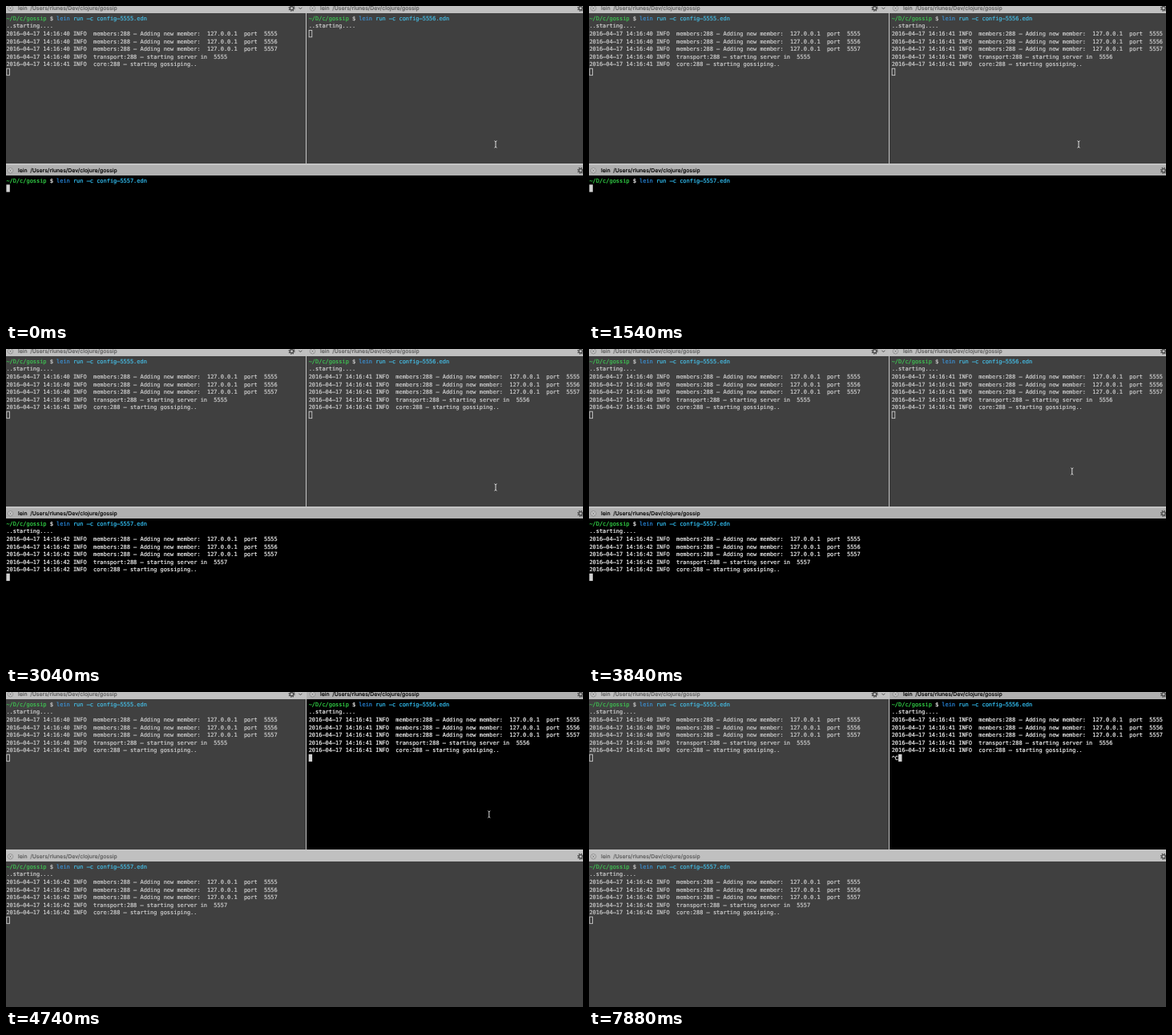
Animation, 720 px wide and 394 px high, one loop 8000 ms. Source, as an HTML page:

```html
<!DOCTYPE html>
<html lang="en">
<head>
<meta charset="utf-8">
<title>Three terminals</title>
<style>
html, body { margin: 0; width: 100%; height: 100%; overflow: hidden; background: #000; }
svg { display: block; width: 720px; height: 394px; }
text { white-space: pre; text-rendering: geometricPrecision; fill: currentColor; }
.term, .term tspan { fill: currentColor; stroke: currentColor; stroke-width: .18; }
.term { font: 6.95px "DejaVu Sans Mono", monospace; }
.title { font: 500 6.85px Inter, sans-serif; stroke: currentColor; stroke-width: .12; }
</style>
</head>
<body>
<svg id="stage" viewBox="0 0 720 394"></svg>
<script>
const LOOP = 8000, FOCUS = 3860, INTERRUPT = 7820;
const CHAR = 4.185, ROW = 9.57;
const stage = document.getElementById("stage");

// Moments: start message, member list, server line, gossip line.
const panes = [
  { x: 0, y: -4, w: 374, h: 201, port: 5555, secs: [40, 40, 41], at: [0, 0, 0, 0], menu: true },
  { x: 375, y: -4, w: 345, h: 201, port: 5556, secs: [41, 41, 41], at: [0, 20, 60, 100] },
  { x: 0, y: 199, w: 720, h: 195, port: 5557, secs: [42, 42, 42], at: [1560, 1700, 1740, 1800] }
];

const rect = (x, y, w, h, fill, more = "") =>
  `<rect x="${x}" y="${y}" width="${w}" height="${h}" fill="${fill}" ${more}/>`;
const line = (d, color, width) =>
  `<path d="${d}" fill="none" stroke="${color}" stroke-width="${width}"/>`;
const span = (color, s) => `<tspan color="${color}">${s}</tspan>`;

function gear(x, y) {
  return `<circle cx="${x}" cy="${y}" r="3.4" fill="none" stroke="#484848" stroke-width="1.4" stroke-dasharray="1.33 1.34"/>
    <circle cx="${x}" cy="${y}" r="2.2" fill="none" stroke="#484848" stroke-width="1.3"/>`;
}

function titleBar(p, active) {
  const mid = p.y + 6.8, x = p.x + (p.x ? 2 : 0);
  const ink = active ? "#000" : "#5c5c5c";
  return rect(p.x, p.y, p.w, 13, active ? "#b0b0b0" : "#c0c0c0") +
    `<circle cx="${x + 5.5}" cy="${mid}" r="3.2" fill="#d0d0d0" stroke="#777" stroke-width=".7"/>` +
    line(`M${x + 4.2} ${mid - 1.3}l2.6 2.6m0-2.6l-2.6 2.6`, "#666", .8) +
    `<text class="title" x="${x + 15}" y="${mid + 2.3}" color="${ink}">lein  /Users/rlunes/Dev/clojure/gossip</text>` +
    gear(p.menu ? 356.5 : 717, mid) +
    (p.menu ? line(`M365.4 ${mid - 1}l2 2 2-2`, "#505050", 1) : "");
}

function logLines(p, t) {
  const stamp = i => `2016–04–17 14:16:${p.secs[i]} INFO  `;
  const lines = [];
  if (t >= p.at[0]) lines.push("..starting....");
  if (t >= p.at[1]) for (const port of [5555, 5556, 5557])
    lines.push(stamp(0) + `members:288 – Adding new member:  127.0.0.1  port  ${port}`);
  if (t >= p.at[2]) lines.push(stamp(1) + `transport:288 – starting server in  ${p.port}`);
  if (t >= p.at[3]) lines.push(stamp(2) + "core:288 – starting gossiping..");
  return lines;
}

function pane(p, t, active) {
  const x = p.x + (p.x ? 2.7 : .4), base = p.y + 21.8;
  const c = active ? ["#35dc4b", "#2a8fe8", "#35c8ff", "#f4f4f4"] : ["#3fc653", "#3b92d6", "#45bfe8", "#d0d0d0"];
  const lines = logLines(p, t);
  const row = (s, i) => `<text class="term" x="${x}" y="${base + i * ROW}" color="${c[3]}">${s}</text>`;
  const prompt = span(c[0], "~/D/c/gossip") + " $ " + span(c[1], "lein") +
    span(c[2], ` run –c config–${p.port}.edn`);
  const cursorRow = lines.length + 1;
  const typed = active && t >= INTERRUPT ? "^C" : "";
  const cx = x + typed.length * CHAR, cy = base + cursorRow * ROW - 7;
  return rect(p.x, p.y, p.w, p.h, active ? "#000" : "#404040") + titleBar(p, active) +
    row(prompt, 0) + lines.map((s, i) => row(s, i + 1)).join("") + row(typed, cursorRow) +
    (active ? rect(cx, cy, 4.4, 9.3, "#d2d2d2")
      : rect(cx + .4, cy + .4, 3.7, 8.5, "none", 'stroke="#d8d8d8" stroke-width=".8"'));
}

function pointer(t) {
  if (t >= INTERRUPT) return "";
  const k = Math.min(1, Math.max(0, (t - 3240) / 460)), e = k * k * (3 - 2 * k);
  const x = 611 - 8.2 * e, y = 173 - 20 * e;
  return line(`M${x - 1.5} ${y - 4.3}l1.5 1 1.5-1M${x} ${y - 3.3}v6.6M${x - 1.5} ${y + 4.3}l1.5-1 1.5 1`, "#eee", .9);
}

let shown = "";
function draw(now) {
  const t = now % LOOP, focus = t < FOCUS ? 2 : 1;
  const art = rect(0, 0, 720, 394, "#c4c4c4") +
    panes.map((p, i) => pane(p, t, i === focus)).join("") + pointer(t);
  if (art !== shown) stage.innerHTML = shown = art;
}

const start = performance.now();
function tick() {
  draw(performance.now() - start);
  requestAnimationFrame(tick);
}
tick();
</script>
</body>
</html>
```
